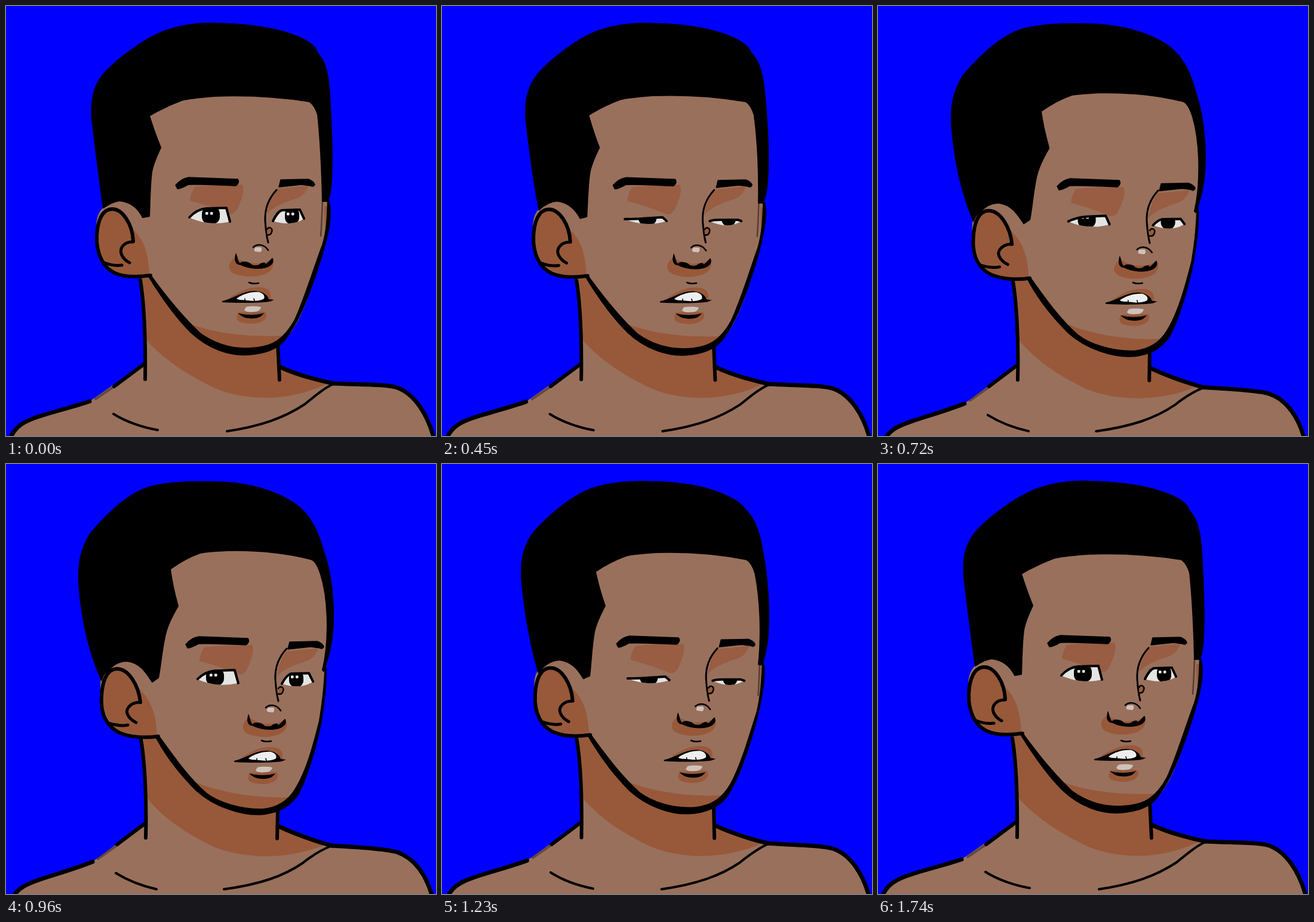
An HTML page that plays this animation: 720x720 px, repeating every 1.8 s.

```html
<!DOCTYPE html>
<html lang="en">
<head>
<meta charset="utf-8">
<title>Turning head</title>
<style>
  html, body { margin: 0; width: 100%; height: 100%; overflow: hidden; background: #0000fe; }
  svg { display: block; width: 100vw; height: 100vh; }
</style>
</head>
<body>
<svg viewBox="0 0 720 720" stroke-linecap="round" stroke-linejoin="round">
  <defs></defs>
</svg>
<script>
const SKIN = '#99705c', SHADE = '#98593a', SOCKET = '#985d42', SHINE = '#cfc2bb', INK = '#000';
const svg = document.querySelector('svg'), defs = document.querySelector('defs');

function add(parent, tag, attrs) {
  const node = document.createElementNS('http://www.w3.org/2000/svg', tag);
  for (const name in attrs) node.setAttribute(name, attrs[name]);
  return parent.appendChild(node);
}

const fill = color => ({ fill: color });
const line = (width, opacity = 1) => ({ fill: 'none', stroke: INK, 'stroke-width': width, 'stroke-opacity': opacity });
const brush = width => ({ ...line(width), fill: INK });

// Blends two paths that share the same commands.
function mix(from, to, k) {
  const ends = to.match(/-?[\d.]+/g);
  let n = 0;
  return from.replace(/-?[\d.]+/g, v => (+v + (ends[n++] - v) * k).toFixed(2));
}

const updates = [];

// A part whose outline changes as the head turns.
function morph(style, from, to) {
  const node = add(svg, 'path', style);
  updates.push(turn => node.setAttribute('d', mix(from, to, turn)));
}

// A part that only slides as the head turns.
function slide(style, dx, dy, d) {
  const node = add(svg, 'path', { ...style, d });
  updates.push(turn => node.setAttribute('transform', `translate(${dx * turn} ${dy * turn})`));
}

function eye(id, dx, dy, pupilX, pupilY, pupilR, open, low) {
  const clip = add(add(defs, 'clipPath', { id }), 'path', {});
  const group = add(svg, 'g', {});
  const white = add(group, 'path', fill('#e4e4e2'));
  const inside = add(group, 'g', { 'clip-path': `url(#${id})` });
  const pupil = add(inside, 'g', {});
  add(pupil, 'rect', { x: pupilX - pupilR, y: pupilY - 15, width: 2 * pupilR, height: 29, rx: 12, fill: INK });
  for (const x of [-9, -1]) add(pupil, 'rect', { x: pupilX + x, y: pupilY - 6, width: 4.5, height: 4.5, rx: 1, fill: '#eee' });
  const lid = add(group, 'path', line(4));
  updates.push((turn, droop) => {
    const shape = mix(open, low, droop);
    group.setAttribute('transform', `translate(${dx * turn} ${dy * turn})`);
    pupil.setAttribute('transform', `translate(${(7 - dx) * turn} ${2 * droop})`);
    clip.setAttribute('d', shape);
    white.setAttribute('d', shape);
    lid.setAttribute('d', shape.slice(0, shape.lastIndexOf('C')));
  });
}

// Body
morph(fill(SKIN),
  'M8 722C14 706 22 700 34 694C60 682 100 675 140 662L232 598L228 450L455 550L457 603C485 615 520 626 548 632L630 634C672 636 702 670 716 722Z',
  'M14 722C20 710 28 706 40 700C66 689 105 680 145 666L234 600L228 452L455 560L455 605C485 619 520 632 545 638L630 646C670 648 700 676 714 722Z');
morph(fill(SHADE),
  'M226 458L234 558C262 590 300 616 350 640C400 661 470 664 537 633C510 627 480 614 458 604L455 560L400 500L240 440Z',
  'M228 460L235 558C262 592 300 618 350 642C400 661 470 664 535 637C510 630 480 618 455 606L455 570L400 500L250 445Z');
morph(line(6), 'M225 459C230 490 234 545 233 625', 'M226 461C231 490 236 550 234 626');
morph(line(6), 'M455 566L458 626', 'M455 580L454 627');
morph(line(7), 'M8 722C16 704 30 696 50 689C80 679 110 672 140 662', 'M14 722C22 709 36 703 56 696C86 686 115 678 145 666');
morph(line(4, .35), 'M150 658L184 635', 'M154 661L188 637');
morph(line(6), 'M181 637L232 599', 'M186 637L234 601');
morph(line(7), 'M458 604C485 617 520 626 548 632', 'M455 606C485 620 520 632 545 639');
morph(line(7), 'M548 632C590 634 637 633 655 639C685 650 706 685 716 722', 'M545 639C600 642 640 645 655 650C685 660 704 690 713 722');
morph(line(4), 'M180 683C200 696 230 706 254 710', 'M184 685C205 698 230 707 252 712');
morph(line(4), 'M370 712C425 704 465 690 500 667C516 654 532 640 548 633', 'M365 712C425 704 465 690 497 668C512 656 530 645 546 639');

// Face and jaw
morph(fill(SKIN),
  'M235 140L535 140L540 280L540 328C545 380 525 430 505 490C490 530 475 555 455 570C430 582 380 582 340 565C300 545 265 495 240 453L200 340Z',
  'M260 135L526 140L545 240L535 342C536 400 525 450 510 500C495 540 480 565 465 575C440 585 390 585 350 565C315 545 280 500 254 458L215 350Z');
morph(fill(SHADE), 'M295 527C340 547 400 555 466 552L445 574L380 579L330 560Z', 'M308 529C345 545 400 560 478 558L455 580L385 582L340 562Z');
morph(fill(SHADE), 'M533 335L539 335L534 375Z', 'M534 345L535 345L533 375Z');
morph(line(2.5, .45), 'M530 325C529 345 529 360 527 385', 'M534 345C533 360 533 375 532 390');
morph(brush(2),
  'M239 453C268 500 289 526 309 546C340 575 375 586 405 584C435 582 455 573 466 560C490 530 505 490 522 440C535 400 543 370 543 345C543 335 541 328 539 323C538 350 538 375 530 400C515 440 500 490 484 525C465 560 445 569 420 572C380 577 350 566 325 548C295 520 267 485 243 452Z',
  'M252 459C272 497 298 526 319 547C350 575 395 588 425 587C460 585 478 570 490 552C508 515 520 470 528 430C533 400 536 370 536 345C536 343 536 342 535 340C533 370 530 400 525 430C515 470 503 515 484 545C470 568 450 576 430 578C395 579 355 567 335 551C305 525 281 490 257 457Z');

// Ear and hair
morph(fill(SKIN),
  'M164 337C172 312 212 310 228 345L241 400L242 452C220 458 190 456 175 440C155 425 150 400 151 370C151 355 156 342 164 337Z',
  'M164 350C176 316 222 318 243 358L256 400L256 456C230 462 200 460 184 444C163 428 158 402 158 374C158 358 160 352 164 350Z');
morph(brush(2),
  'M163 338C156 290 150 240 144 190C141 150 150 130 165 112C185 90 230 55 268 41C300 30 330 28 352 29C400 30 450 36 485 50C505 58 518 66 521 78C535 92 540 115 542 150C545 200 547 250 545 290C544 310 541 322 538 327L530 327C529 280 527 230 522 182C519 172 514 164 508 160C450 151 400 149 350 151C325 153 305 155 294 158C275 165 255 175 240 184C246 203 252 220 259 237C252 252 246 265 244 278C241 300 241 330 240 352L229 354C222 340 210 328 190 326C178 328 170 333 163 338Z',
  'M160 362C140 318 126 260 122 200C120 160 128 140 140 118C165 88 200 52 238 39C270 30 310 29 344 30C385 30 415 36 440 45C462 53 485 65 496 77C515 95 525 122 533 150C547 190 551 250 546 290C543 315 536 335 532 347L530 345C541 300 541 230 527 185C523 172 518 163 512 160C470 149 420 144 370 145C350 146 335 147 325 149C305 156 290 165 275 176C278 200 283 220 288 238C279 253 271 268 267 285C261 310 259 340 255 358L245 365C235 350 225 333 203 330C190 330 175 335 160 362Z');
morph(fill(SHADE),
  'M165 343C185 335 205 350 213 375C230 388 239 415 240 451C215 458 185 452 172 436C155 420 150 390 153 365C155 350 160 345 165 343Z',
  'M172 347C192 337 215 352 224 378C242 393 252 420 253 455C225 461 195 455 182 440C163 422 158 392 160 368C162 353 167 349 172 347Z');
morph(line(6),
  'M213 394C212 365 195 340 178 340C160 340 153 362 152 385C151 415 163 438 182 447C200 455 222 454 242 451',
  'M225 399C222 370 205 343 186 343C168 343 161 365 160 390C158 420 170 440 190 450C208 458 235 459 255 456');
morph(line(5), 'M213 395C198 394 190 405 193 415C196 423 201 427 207 430', 'M224 399C209 399 200 410 203 418C206 426 212 430 218 433');
morph(line(5), 'M165 430C178 435 186 435 194 434', 'M172 434C185 438 195 439 204 437');

// Brows and eye sockets
slide(fill(SOCKET), 16, 4, 'M316 303C340 299 370 301 396 299C400 308 396 320 390 334C386 345 380 350 374 348C350 338 330 332 308 326C308 318 312 310 316 303Z');
slide(fill(SOCKET), 16, 8, 'M452 306L506 301C503 312 497 318 487 322C465 329 450 335 437 348C439 335 444 318 452 306Z');
slide(brush(1.5), 17, 2, 'M284 300C290 293 298 288 306 287L388 290C391 294 389 298 385 301C360 300 325 298 305 299C298 303 291 306 287 306Z');
slide(brush(1.5), 15, 7, 'M460 291L506 290C512 292 516 296 517 299C516 302 513 303 510 301L495 299L457 303Z');
eye('near', 14, 6, 343, 351, 15,
  'M307 354C316 344 324 340 335 339L369 338L375 361C350 367 325 363 307 354Z',
  'M304 356C315 356 324 356 335 355L367 353L374 359C350 367 325 365 304 356Z');
eye('far', 15, 8, 479, 352, 12,
  'M447 360C452 350 456 344 462 342L492 341L499 356C485 366 465 366 447 360Z',
  'M446 359C452 357 456 357 462 357L493 357L499 359C485 368 467 369 446 359Z');

// Nose
slide(line(3), 17, 1, 'M453 308C440 322 433 340 434 360C435 375 437 388 439 396');
slide({ ...line(2.5), fill: SHADE }, 19, 2, 'M437 374C440 368 447 372 445 378C444 382 441 384 437 383');
slide(fill(SHADE), 23, 4, 'M385 420C372 428 370 440 380 447C400 457 432 454 443 443C450 435 448 425 444 424C430 434 400 434 385 420Z');
slide(brush(1), 21, 5, 'M385 415C381 428 386 433 392 433C405 440 428 442 440 436C446 433 449 428 446 422C441 427 438 431 434 433C436 428 427 430 423 434C416 436 411 434 409 431C403 428 395 427 392 431C387 427 388 421 385 415Z');
slide(fill(SHINE), 21, 4, 'M418 404L427 404Q430 408 426 412L417 411Q414 408 418 404Z');
slide(line(2.5), 21, 4, 'M414 404C420 398 432 398 439 409');

// Mouth
slide(line(2.5), 21, 0, 'M407 463Q414 466 423 464');
slide(fill(SHADE), 20, 3, 'M375 488C395 475 410 470 425 471C440 472 444 478 443 488L445 495Z');
slide(fill(INK), 20, 3, 'M362 494C380 490 395 478 415 477C430 477 438 484 440 491L449 492L441 495C430 497 390 498 362 496Z');
slide(fill('#eee'), 20, 3, 'M386 490C395 483 410 478 424 479C431 481 434 486 432 490C428 493 415 495 405 493C396 492 390 493 386 490Z');
slide(line(1.5), 20, 3, 'M400 490L400 494M415 490L416 494');
slide(fill(SHADE), 19, 4, 'M390 513C384 520 385 528 395 530C410 534 425 532 432 526C438 520 437 515 434 512Z');
slide(fill(INK), 19, 4, 'M388 514C400 518 420 518 432 514C427 522 418 524 408 523C400 523 393 519 388 514Z');
slide(fill(SHINE), 19, 4, 'M402 504C412 502 420 503 427 504C426 509 422 512 415 512C408 513 401 512 399 509Z');

function ease(x) {
  x = Math.min(1, Math.max(0, x));
  return x * x * (3 - 2 * x);
}

// 32 steps per loop: each 450 ms holds eight, the fifth only 30 ms long.
function stepAt(ms) {
  const part = ms % 450;
  return 8 * Math.floor(ms / 450) + Math.floor((part < 270 ? part : part + 30) / 60);
}

function draw(now) {
  const step = stepAt(now % 1800);
  const phase = Math.min(step, 32 - step);
  const turn = ease((phase - 6) / 8.2);
  const droop = ease((phase - 1) / 7.5) - ease((phase - 10) / 6);
  for (const update of updates) update(turn, droop);
}

const start = performance.now();
function tick() {
  draw(performance.now() - start);
  requestAnimationFrame(tick);
}
tick();
</script>
</body>
</html>
```
